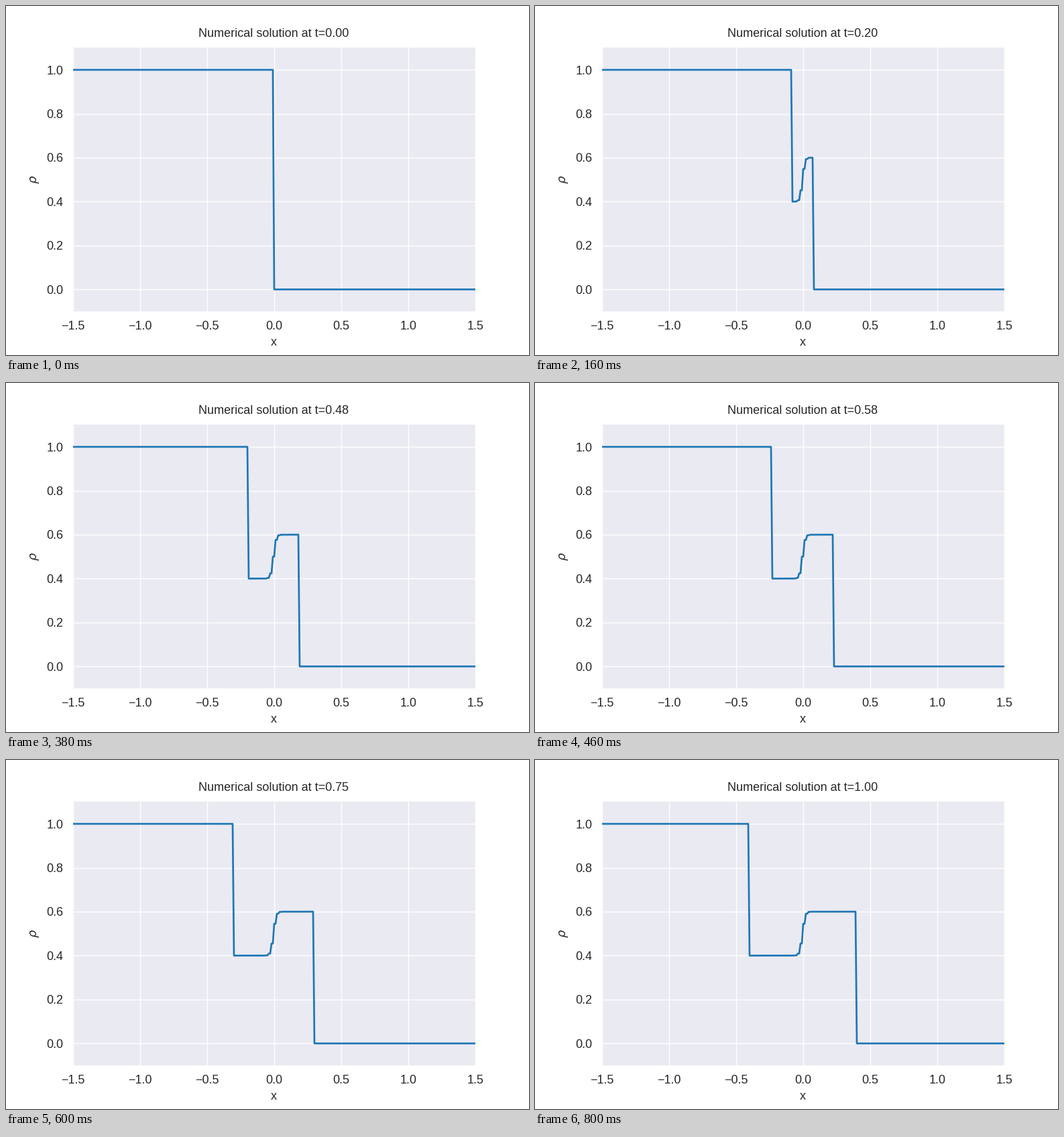
Animation, 780 px wide and 520 px high, one loop 0.82 s. Source, as a matplotlib script:

```python
import numpy as np
import matplotlib.pyplot as plt
from matplotlib.animation import FuncAnimation

W, H, DPI = 780, 520, 130
STEPS, DT, DX = 41, 0.025, 0.01
INK = "#262626"

plt.rcParams.update({
    "font.family": "Liberation Sans",
    "font.size": 10,
    "text.color": INK,
    "mathtext.fontset": "dejavusans",
    "lines.solid_capstyle": "round",
})


def flux(rho):
    return rho * (1 - rho)


def lax_friedrichs(rho):
    """Advance the density by one time step, keeping the end values."""
    new = rho.copy()
    left, right = rho[:-2], rho[2:]
    new[1:-1] = (left + right) / 2 - DT / (2 * DX) * (flux(right) - flux(left))
    return new


cells = np.arange(-150, 151)
x = cells * DX
states = [np.where(cells < 0, 1.0, 0.0)]
for _ in range(STEPS - 1):
    states.append(lax_friedrichs(states[-1]))

fig = plt.figure(figsize=(W / DPI, H / DPI), dpi=DPI, facecolor="white")
ax = fig.add_axes([100 / W, 65 / H, 600 / W, 392.6 / H], facecolor="#EAEAF2")
ax.set_xlim(-1.5, 1.5)
ax.set_ylim(-0.1, 1.1)
ax.set_xticks(np.arange(-3, 4) / 2)
ax.set_yticks(np.arange(6) / 5)
ax.tick_params(length=0, pad=8, labelcolor=INK)
ax.grid(color="white", linewidth=0.8)
ax.set_axisbelow(True)
for spine in ax.spines.values():
    spine.set_visible(False)


def label(px, py, text, **kw):
    """Centred text at a pixel position measured from the top left."""
    return fig.text(px / W, 1 - py / H, text, ha="center", **kw)


title = label(399.5, 46, "")
label(399.5, 506, "x")
label(43, 258.7, r"$\rho$", rotation=90, va="center")
line, = ax.plot(x, states[0], color="#1f77b4", linewidth=1.5)


def draw(k):
    line.set_ydata(states[k])
    title.set_text(f"Numerical solution at t={k * DT:.2f}")
    return line, title


anim = FuncAnimation(fig, draw, frames=STEPS, interval=20, repeat=True,
                     repeat_delay=0, blit=False)
plt.show()
```
